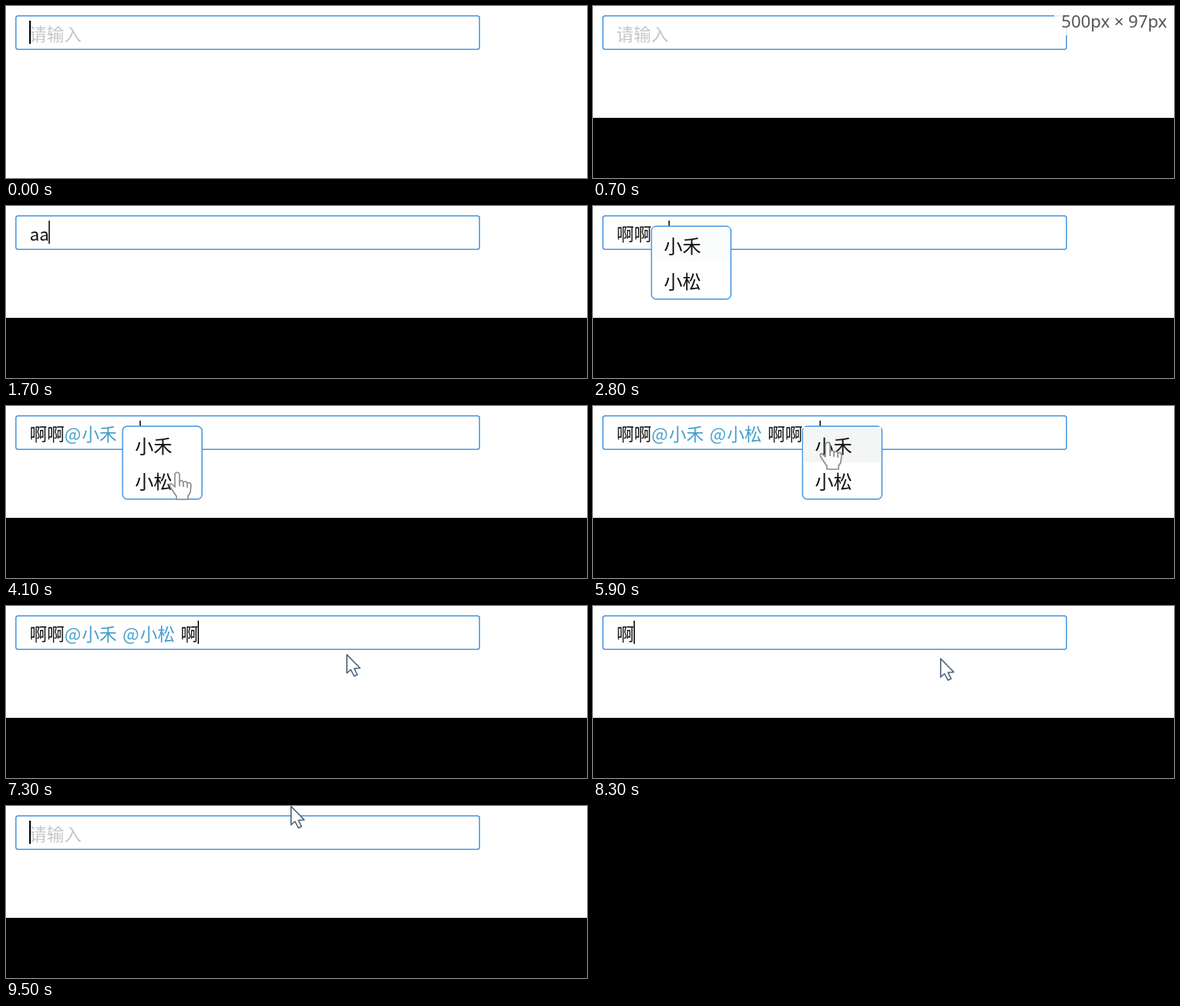
An HTML page with a canvas that plays this animation: 750x223 px, repeating every 9800 ms.

```html
<!DOCTYPE html>
<html lang="zh-CN">
<head>
<meta charset="utf-8">
<style>
html, body { margin: 0; width: 100%; height: 100%; overflow: hidden; background: #fff; }
canvas { display: block; }
</style>
</head>
<body>
<canvas id="stage" width="750" height="223"></canvas>
<script>
const ctx = document.getElementById('stage').getContext('2d');
const LOOP = 9800, STEP = 100;
const CJK = '"Noto Sans CJK SC", "Noto Sans CJK", sans-serif';
const BLUE = '#4596e0', TEXT_X = 30.5;
const NAMES = ['小禾', '小松'];
const first = '啊啊@' + NAMES[0];
const both = first + ' @' + NAMES[1];

// [time, input text, hovered row, time the hover begins]; every edit restarts the caret blink
const edits = [
  [0, ''], [1500, 'a'], [1700, 'aa'], [2100, '啊啊'],
  [2800, '啊啊@', 0, 2700], [3400, first + ' '],
  [3900, first + ' @', 1, 4100], [4500, both + ' '],
  [5000, both + ' 啊'], [5100, both + ' 啊啊'],
  [5500, both + ' 啊啊@', 0, 5600], [6100, both + ' 啊啊@' + NAMES[0] + ' '],
  [6800, both + ' 啊啊@' + NAMES[0]], [7100, both + ' 啊啊'], [7300, both + ' 啊'],
  [7600, both + ' '], [7800, both], [7900, first + ' '], [8000, first],
  [8200, '啊啊'], [8300, '啊'], [8400, ''], [8500, '']
];

// Each pointer run is a polyline of [time, x, y]
const pointerRuns = [
  [[2900, 160, 84], [3300, 115, 48], [3400, 115, 48]],
  [[4000, 200, 96], [4100, 221, 85], [4300, 215, 100], [4500, 222, 100], [4800, 228, 95], [5000, 228, 95]],
  [[5600, 330, 84], [5900, 303, 46], [6100, 303, 46]],
  [[6800, 400, 61], [7100, 436, 62], [7300, 440, 63], [7600, 440, 63], [8400, 450, 69],
   [8700, 450, 71], [9200, 368, 0.5], [9800, 368, 0.5]]
];

// Window height in CSS pixels while it is resized
const heights = [[0, 149], [100, 135], [200, 112], [300, 97]];

const ARROW = new Path2D('M0 0V24L5 19.5L9.5 28L13.5 26L9.5 18L17 17.5Z');
const HAND = new Path2D('M-3 3Q0-1 3 3V13Q6 10 8 14Q11 11 13 15Q17 13 18 18L17 26Q16 30 14 31V36H-1V32L-9 20Q-11 15-7 16L-3 20Z');
const FINGERS = new Path2D('M3 13V19M8 14V20M13 15V21');

const latest = (list, t) => list.findLast(item => item[0] <= t);
const advance = ch => ch === ' ' ? 7.5 : ch === 'a' ? 12.5 : 22.5;

function roundBox(x, y, w, h, r) {
  ctx.beginPath();
  ctx.roundRect(x, y, w, h, r);
  ctx.fillStyle = '#fff';
  ctx.fill();
  ctx.strokeStyle = BLUE;
  ctx.lineWidth = 1.5;
  ctx.stroke();
}

function drawInput(text, caretOn) {
  roundBox(12.75, 12.75, 598.5, 43.5, 3);
  ctx.font = '22.5px ' + CJK;
  let x = TEXT_X;
  if (!text) {
    ctx.fillStyle = '#c6c6c6';
    ctx.fillText('请输入', TEXT_X - 0.5, 44.5);
  }
  for (const part of text.split(/(@小.)/)) {
    ctx.fillStyle = part.startsWith('@小') ? '#459fcb' : '#111';
    for (const ch of part) {
      ctx.fillText(ch, x, 44.5);
      x += advance(ch);
    }
  }
  if (caretOn) {
    ctx.fillStyle = '#000';
    ctx.fillRect(x - 0.5, 19, text ? 1.5 : 2, 30);
  }
  return x;
}

function drawPopup(x, row, shade) {
  roundBox(x, 26.25, 102.5, 94.5, 6);
  ctx.fillStyle = `rgba(244,245,245,${shade})`;
  ctx.fillRect(x + 1, 27 + row * 46, 100.5, 46);
  ctx.font = '24px ' + CJK;
  ctx.fillStyle = '#111';
  NAMES.forEach((name, i) => ctx.fillText(name, x + 16, 61 + i * 46));
}

function drawLabel(height) {
  const label = `500px × ${height}px`;
  ctx.font = '22px "Noto Sans", sans-serif';
  const left = 741 - ctx.measureText(label).width;
  ctx.fillStyle = 'rgba(255,255,255,.85)';
  ctx.fillRect(left - 9, 0, 760 - left, 38);
  ctx.fillStyle = '#555';
  ctx.fillText(label, left, 28);
}

function pointerAt(t) {
  const run = pointerRuns.find(r => t >= r[0][0] && t < r.at(-1)[0]);
  if (!run) return null;
  const i = run.findIndex(p => p[0] > t);
  const [t0, x0, y0] = run[i - 1], [t1, x1, y1] = run[i];
  const k = (t - t0) / (t1 - t0);
  return [x0 + (x1 - x0) * k, y0 + (y1 - y0) * k];
}

function drawPointer([x, y], popupX) {
  const overPopup = popupX !== null && x > popupX && x < popupX + 103 && y > 26 && y < 121;
  if (!overPopup && y > 12 && y < 57) return;
  ctx.save();
  ctx.translate(x, y);
  ctx.lineWidth = 1.6;
  ctx.lineJoin = 'round';
  ctx.fillStyle = overPopup ? 'rgba(255,255,255,.85)' : '#fff';
  ctx.strokeStyle = overPopup ? '#858a8d' : '#48617a';
  const shape = overPopup ? HAND : ARROW;
  ctx.fill(shape);
  ctx.stroke(shape);
  if (overPopup) ctx.stroke(FINGERS);
  ctx.restore();
}

function draw(t) {
  const [since, text, row, hoverStart] = latest(edits, t);
  const height = latest(heights, t)[1];
  ctx.fillStyle = '#fff';
  ctx.fillRect(0, 0, 750, 223);

  const caretX = drawInput(text, (t - since) % 1000 < 500);
  let popupX = null;
  if (text.endsWith('@')) {
    popupX = caretX - 22.5;
    drawPopup(popupX, row, Math.max(0, Math.min(1, (t - hoverStart) / 300)));
  }
  if (t >= 100 && t < 1200) drawLabel(height);
  if (t >= 100) {
    ctx.fillStyle = '#000';
    ctx.fillRect(0, Math.round(height * 1.5 - 0.5), 750, 223);
  }
  const pointer = pointerAt(t);
  if (pointer) drawPointer(pointer, popupX);
}

const start = performance.now();
function frame() {
  const t = (performance.now() - start) % LOOP;
  draw(Math.floor(t / STEP) * STEP);
  requestAnimationFrame(frame);
}
frame();
</script>
</body>
</html>
```
